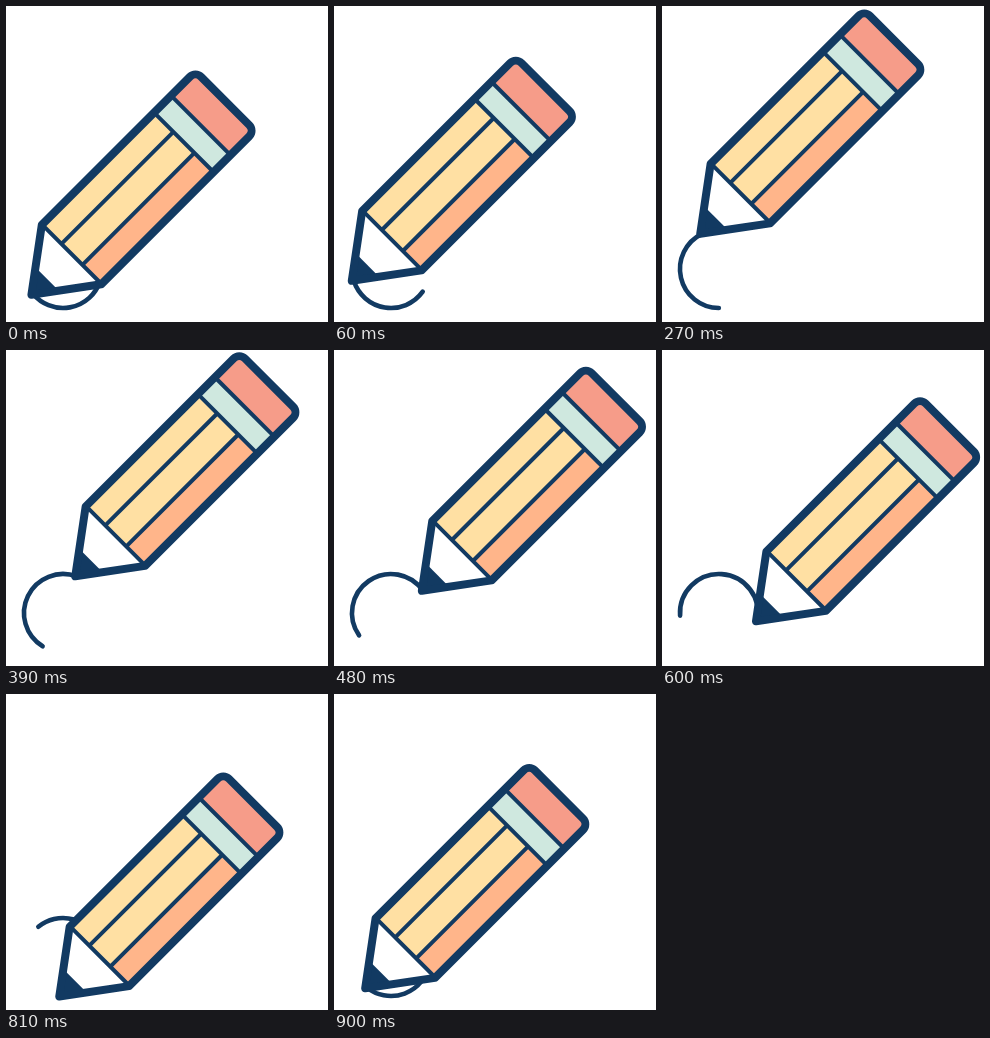
Write an HTML page that moves like this. It is 322 px wide and 316 px high and loops after 930 ms.

```html
<!DOCTYPE html>
<html lang="en">
<head>
<meta charset="utf-8">
<title>Drawing pencil</title>
<style>
  html, body { margin: 0; width: 100%; height: 100%; overflow: hidden; background: #fff; }
  svg { display: block; width: 100%; height: 100%; }
</style>
</head>
<body>
<svg viewBox="0 0 322 316" fill="none" stroke="#123a62" stroke-width="4">
  <path id="trail" stroke-width="4.6" stroke-linecap="round"/>
  <!-- Pencil lies along the x axis, its point near the origin -->
  <g id="pencil">
    <g stroke="none">
      <path fill="#fff" d="M3 0L59.7-42V42Z"/>
      <path fill="#123a62" d="M3 0L25.2-17V17Z"/>
      <path fill="#ffe0a3" d="M59.7-42H218.5V42H59.7Z"/>
      <path fill="#ffb58a" d="M59.7 15H218.5V42H59.7Z"/>
      <path fill="#cfe8df" d="M218.5-42H242.5V42H218.5Z"/>
      <path fill="#f69c89" d="M242.5-42H269a8 8 0 0 1 8 8V34a8 8 0 0 1-8 8H242.5Z"/>
    </g>
    <path d="M60.2-42V42M218.5-42V42M242.5-42V42M60.2-14.7H218.5M60.2 15H218.5"/>
    <path stroke-width="8" stroke-linejoin="round"
      d="M3 0L59.7-42H269a8 8 0 0 1 8 8V34a8 8 0 0 1-8 8H59.7Z"/>
  </g>
</svg>
<script>
  const LOOP = 930, STEP = 30;
  const trail = document.getElementById('trail');
  const pencil = document.getElementById('pencil');

  const onCircle = (cx, cy, r, degrees) => {
    const a = degrees * Math.PI / 180;
    return [cx + r * Math.cos(a), cy + r * Math.sin(a)];
  };

  function draw(now) {
    const p = Math.floor(now % LOOP / STEP) * STEP / LOOP;
    const head = 139.6 + 360 * p;
    // The trail's end chases the point more slowly and restarts under the pencil
    const tail = 20 + 242 * p;
    const large = head - tail > 180 ? 1 : 0;
    trail.setAttribute('d',
      `M${onCircle(57, 263, 39, tail)}A39 39 0 ${large} 1 ${onCircle(57, 263, 39, head)}`);
    pencil.setAttribute('transform',
      `translate(${onCircle(53.3, 265.3, 39.4, head)}) rotate(-45)`);
    requestAnimationFrame(draw);
  }
  requestAnimationFrame(draw);
</script>
</body>
</html>
```
